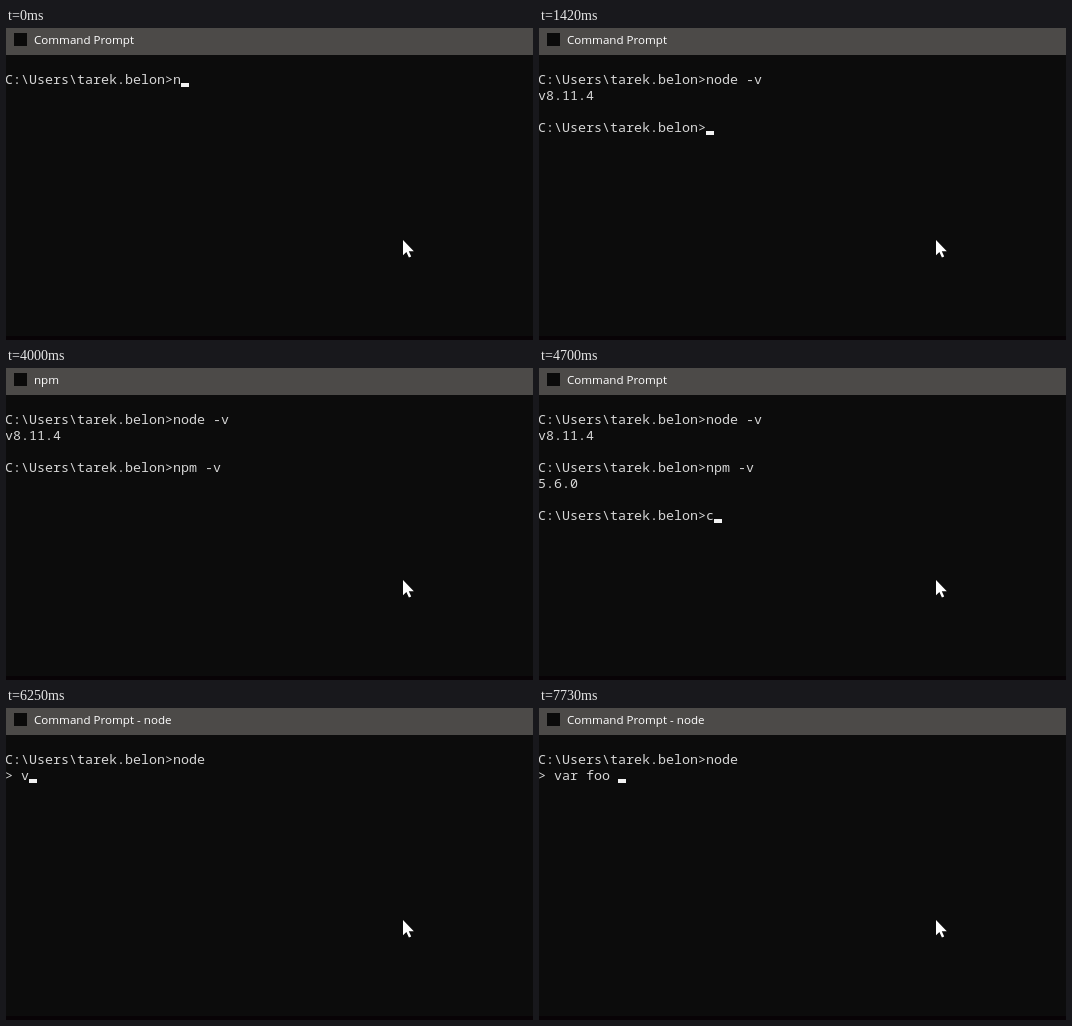
An HTML page that plays this animation: 527 px wide and 312 px high, repeating every 8000 ms.

```html
<!DOCTYPE html>
<html lang="en">
<head>
<meta charset="utf-8">
<title>Console</title>
<style>
  html, body { margin: 0; width: 100%; height: 100%; overflow: hidden; background: #0c0c0c; }
  svg { display: block; }
  text { white-space: pre; }
  #title { font: 11.6px "Open Sans", "Noto Sans", sans-serif; fill: #fff; }
  #rows { font: 13.333px "Noto Sans Mono", "DejaVu Sans Mono", monospace; fill: #d6d6d6; }
</style>
</head>
<body>
<svg width="527" height="312" viewBox="0 0 527 312">
  <rect width="527" height="312" fill="#0c0c0c"/>
  <rect width="527" height="27" fill="#4c4a48"/>
  <rect y="308" width="527" height="4" fill="#080306"/>
  <rect x="8" y="5" width="13" height="13" fill="#0a0a0a"/>
  <text id="title" x="28" y="16"></text>
  <g id="rows"></g>
  <rect id="caret" width="8" height="4" fill="#f2f2f2"/>
  <path d="M397 212v15.2l3.4-3.2 2.5 5.6 2.3-1-2.4-5.4h5z" fill="#fff"/>
</svg>
<script>
const LOOP = 8000, CELL = 8, LINE = 16, LEFT = -1, BASE = 56;
const APP = 'Command Prompt', PROMPT = 'C:\\Users\\tarek.belon>';
const steps = [];
let text = PROMPT, title = APP;

// Append to the screen at a given time; the caret follows the text.
const put = (time, added = '', caret = true) => {
  text += added;
  steps.push({ time, text, title, caret });
};
const type = (word, ...times) => times.forEach((time, i) => put(time, word[i]));

type('node -v', 0, 170, 250, 320, 640, 790, 940);
put(1180, '\n');
put(1270, '', false);
title = APP + ' - node  -v';
put(1340, '', false);
title = APP;
put(1420, 'v8.11.4\n\n' + PROMPT);

put(2350, '', false);
put(2670, 'n', false);
put(2820, 'p', false);
type('m -v', 2990, 3170, 3400, 3610);
put(3770, '\n');
title = APP + ' - npm  -v';
put(3860);
title = 'npm';
put(4000, '', false);
title = APP;
put(4470, '5.6.0\n\n' + PROMPT);
type('cls\n', 4600, 4720, 4830, 4930);

text = PROMPT;
put(5010);
type('node\n', 5170, 5320, 5400, 5480, 5540);
title = APP + ' - node';
put(5620, '', false);
put(5770, '> ', false);
put(5850);
type('var foo ', 6250, 6480, 6650, 6800, 7260, 7420, 7580, 7730);

const byId = id => document.getElementById(id);
const rows = Array.from({ length: 7 }, (_, i) => {
  const row = document.createElementNS('http://www.w3.org/2000/svg', 'text');
  row.setAttribute('x', LEFT);
  row.setAttribute('y', BASE + i * LINE);
  return byId('rows').appendChild(row);
});

let shown;
function draw(now) {
  const time = now % LOOP;
  const step = steps.findLast(s => s.time <= time);
  if (step !== shown) {
    shown = step;
    const lines = step.text.split('\n'), last = lines.length - 1;
    rows.forEach((row, i) => row.textContent = lines[i] || '');
    byId('title').textContent = step.title;
    const caret = byId('caret');
    caret.setAttribute('x', LEFT + lines[last].length * CELL);
    caret.setAttribute('y', BASE - 1 + last * LINE);
    caret.setAttribute('visibility', step.caret ? 'visible' : 'hidden');
  }
  requestAnimationFrame(draw);
}
draw(0);
</script>
</body>
</html>
```
